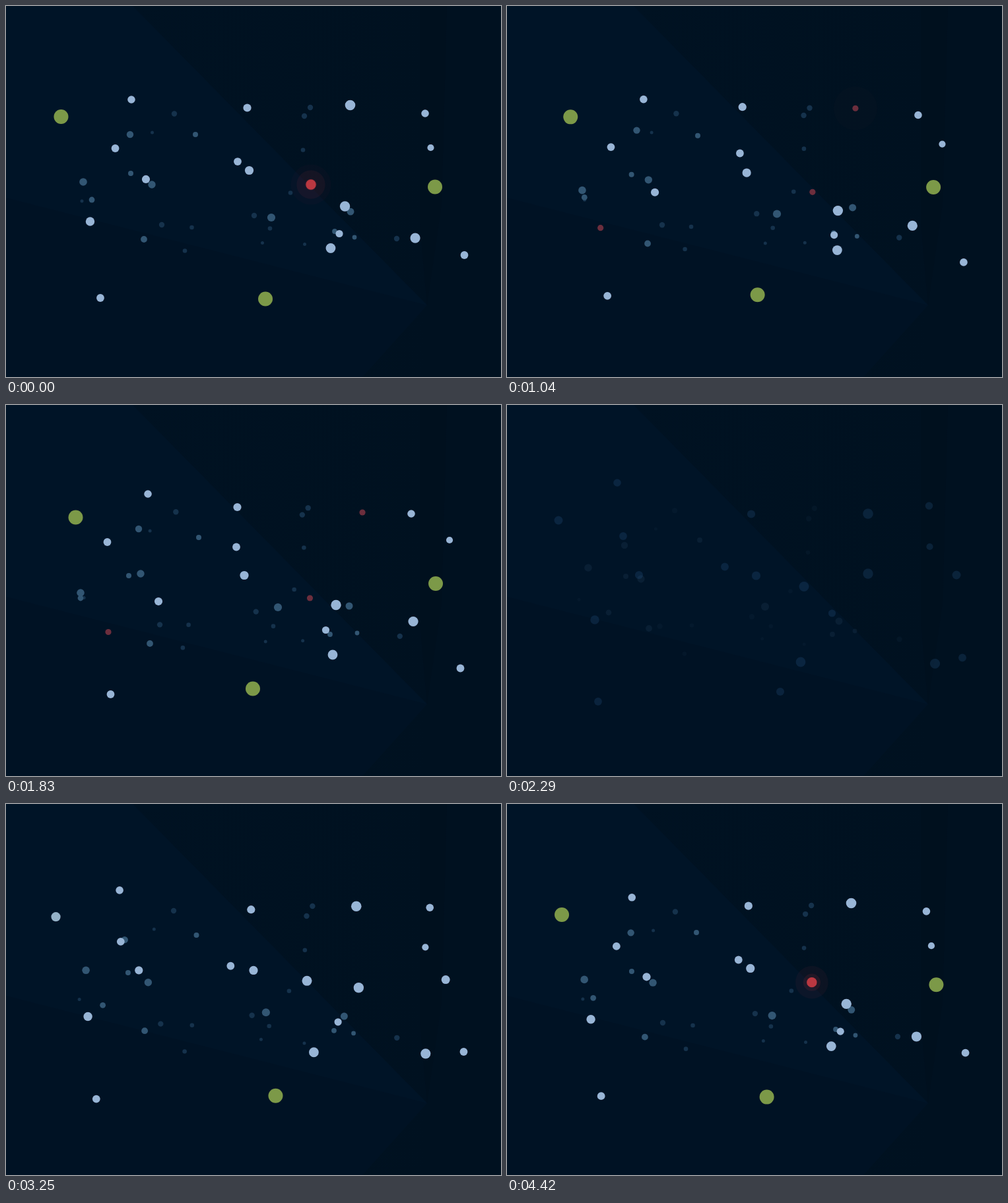
Write an HTML page with a canvas that moves like this. It is 750 px wide and 563 px high and loops after 4460 ms.

```html
<!DOCTYPE html>
<html lang="en">
<head>
<meta charset="utf-8">
<title>Drifting signals</title>
<style>
  html, body { margin: 0; width: 100%; height: 100%; overflow: hidden; background: #001224; }
  canvas { display: block; width: 750px; height: 563px; }
</style>
</head>
<body>
<canvas id="stage" width="750" height="563"></canvas>
<script>
const ctx = document.getElementById('stage').getContext('2d');
const LOOP = 4460, FRAMES = 107, STEP = LOOP / FRAMES;
const FIRST = 55;    // frame at which the dots begin to fade in
const SHOWN = 104;   // frames until they vanish again
const SWAY = 2 * Math.PI / 9000;   // angular speed shared by all dots
const KEYS = [0, 2170, 4000];      // ms at which a dot meets its three points

const WHITE = [152, 181, 214], MID = [50, 86, 115], FAR = [21, 50, 76], DAWN = [36, 110, 176];
const KINDS = {
  green: { color: [124, 153, 72], rest: [124, 153, 72], peak: 11, end: 11, reach: 46, glow: 0.32 },
  red: { color: [186, 56, 65], rest: [108, 46, 61], peak: 7.7, end: 4.6, reach: 36, glow: 0.2 },
};

const clamp = v => Math.min(1, Math.max(0, v));
const lerp = (a, b, k) => a + (b - a) * k;
const mix = (a, b, k) => a.map((v, i) => lerp(v, b[i], k));
const easeOut = p => 1 - (1 - p) * (1 - p);

let seed = 7;
const random = () => (seed = seed * 16807 % 2147483647) / 2147483647;

// The one sine wave of the shared period that passes through all three points
const half = t => Math.sin(SWAY * t / 2);
const weights = t => KEYS.map((a, i) =>
  KEYS.reduce((w, b, j) => i === j ? w : w * half(t - b) / half(a - b), 1));

function sway(...p) {
  return t => {
    const [a, b, c] = weights(t);
    return [a * p[0] + b * p[2] + c * p[4], a * p[1] + b * p[3] + c * p[5]];
  };
}

// A small random swing that is at home at the middle key
function hover(x, y) {
  const swing = () => {
    const size = 2 + 3 * random(), phase = 6.28 * random();
    return t => size * (Math.sin(SWAY * (t - KEYS[1]) + phase) - Math.sin(phase));
  };
  const dx = swing(), dy = swing();
  return t => [x + dx(t), y + dy(t)];
}

const far = [], mid = [], near = [];
const haze = (r, ...homes) => homes.forEach(([x, y]) => far.push({ r, at: hover(x, y) }));
const drift = (layer, r, ...path) => layer.push({ r, at: sway(...path) });
const signal = (kind, start, r, ...path) =>
  near.push({ ...KINDS[kind], start, r, at: sway(...path) });

haze(4.2, [255, 163.5], [461, 154], [452, 167], [236, 332], [376, 318], [592, 353]);
haze(3.3, [450, 218.5], [431, 283.5], [281.5, 336], [271, 371.5], [400, 337.5]);
haze(2.5, [221.5, 192], [115, 296], [388.5, 359.5], [452.5, 361.5]);

drift(mid, 5.2, 178,213, 188,195, 201,188);
drift(mid, 5.8, 123,247, 117,267, 113,285);
drift(mid, 4, 180,260, 189,254, 186,259);
drift(mid, 5.7, 203,264, 221,271, 204,256);
drift(mid, 4.4, 154,315, 130,294, 113,293);
drift(mid, 4.9, 215,339, 209,354, 218,362);
drift(mid, 4, 292,205, 287,195, 292,201);
drift(mid, 6.1, 391,306, 402,321, 412,307);
drift(mid, 5.5, 503,328, 522,312, 520,305);
drift(mid, 3.9, 493,348, 498,342, 491,348);
drift(mid, 3.4, 527,343, 528,351, 532,346);

drift(near, 5.8, 167,118, 190,142, 215,135);
drift(near, 5.9, 176,199, 165.5,216, 153.5,208);
drift(near, 6.1, 200,258, 212,263, 231,298);
drift(near, 6.1, 370,165.5, 365.5,154.5, 350.5,155);
drift(near, 5.9, 330,245.5, 351,236, 349,215.5);
drift(near, 6.6, 377.5,259, 368.5,249.5, 361,258.5);
drift(near, 7.7, 547,256, 513.5,304, 500,303.5);
drift(near, 5.6, 492.5,316, 505,345.5, 484.5,341.5);
drift(near, 7.4, 445,390, 492,367.5, 495,379);
drift(near, 7.6, 648.5,392.5, 620,352, 617,328.5);
drift(near, 5.9, 690,383.5, 694.5,378, 688.5,399.5);
drift(near, 5.8, 639.5,153, 635,163, 614,165);
drift(near, 5.1, 640.5,215, 643.5,215, 672,205);
drift(near, 5.9, 138,450, 143,443, 158.5,439);

signal('green', 385, 6, 414,435, 393,444.5, 374,430.5);
signal('green', 950, 6.5, 78,175, 83.5,168, 105.5,170.5);
signal('green', 1170, 6.5, 681,258, 650,274.5, 651,271);
signal('red', 2015, 7.5, 450,275.5, 462,271, 460.5,293);
signal('red', 2580, 6.7, 133,326, 127.5,327, 155,344.5);
signal('red', 2910, 7.8, 547,165, 521.5,150.5, 540,163);

function disc([x, y], r, color, alpha) {
  ctx.fillStyle = `rgba(${color.map(Math.round)},${alpha})`;
  ctx.beginPath();
  ctx.arc(x, y, r, 0, 7);
  ctx.fill();
}

function area(fill, ...p) {
  ctx.fillStyle = fill;
  ctx.beginPath();
  for (let i = 0; i < p.length; i += 2) ctx.lineTo(p[i], p[i + 1]);
  ctx.fill();
}

function backdrop() {
  area('#001224', 0, 0, 750, 0, 750, 563, 0, 563);
  const shade = ctx.createLinearGradient(190, 0, 640, 0);
  shade.addColorStop(0, '#001222');
  shade.addColorStop(1, '#001120');
  area(shade, 192, 0, 750, 0, 750, 563, 540, 563, 638, 454);
  area('#00101e', 627, 0, 668, 0, 660, 300, 638, 454, 627, 330);
  area('#001427', 0, 0, 192, 0, 638, 454, 0, 291);
}

function drawSignal(dot, t, fade, base) {
  const age = t - dot.start, place = dot.at(t);
  for (let i = 0; i < 3; i++) {
    const p = (age - i * 60) / 250;
    if (p > 0 && p < 1) disc(place, dot.reach * easeOut(p), dot.color, dot.glow * (1 - p) ** 2);
  }
  const rise = easeOut(clamp(age / 130)), calm = clamp((age - 170) / 120);
  const r = lerp(lerp(dot.r, dot.peak, rise), dot.end, calm);
  const color = mix(mix(base, dot.color, clamp(age / 90)), dot.rest, calm);
  disc(place, r, color, fade);
}

function drawLayer(layer, t, color, fade) {
  for (const dot of layer) {
    if (t > dot.start) drawSignal(dot, t, fade, color);
    else disc(dot.at(t), dot.r, color, fade);
  }
}

function draw(now) {
  const frame = Math.floor((now % LOOP + 5) / STEP);
  const n = (frame - FIRST + FRAMES) % FRAMES;
  backdrop();
  if (n >= SHOWN) return;
  const t = n * STEP;
  const fade = clamp((t + 52) / 300);
  drawLayer(far, t, FAR, fade);
  drawLayer(mid, t, MID, fade);
  drawLayer(near, t, mix(DAWN, WHITE, fade), fade);
}

const origin = performance.now();
function tick() {
  draw(performance.now() - origin);
  requestAnimationFrame(tick);
}
tick();
</script>
</body>
</html>
```
